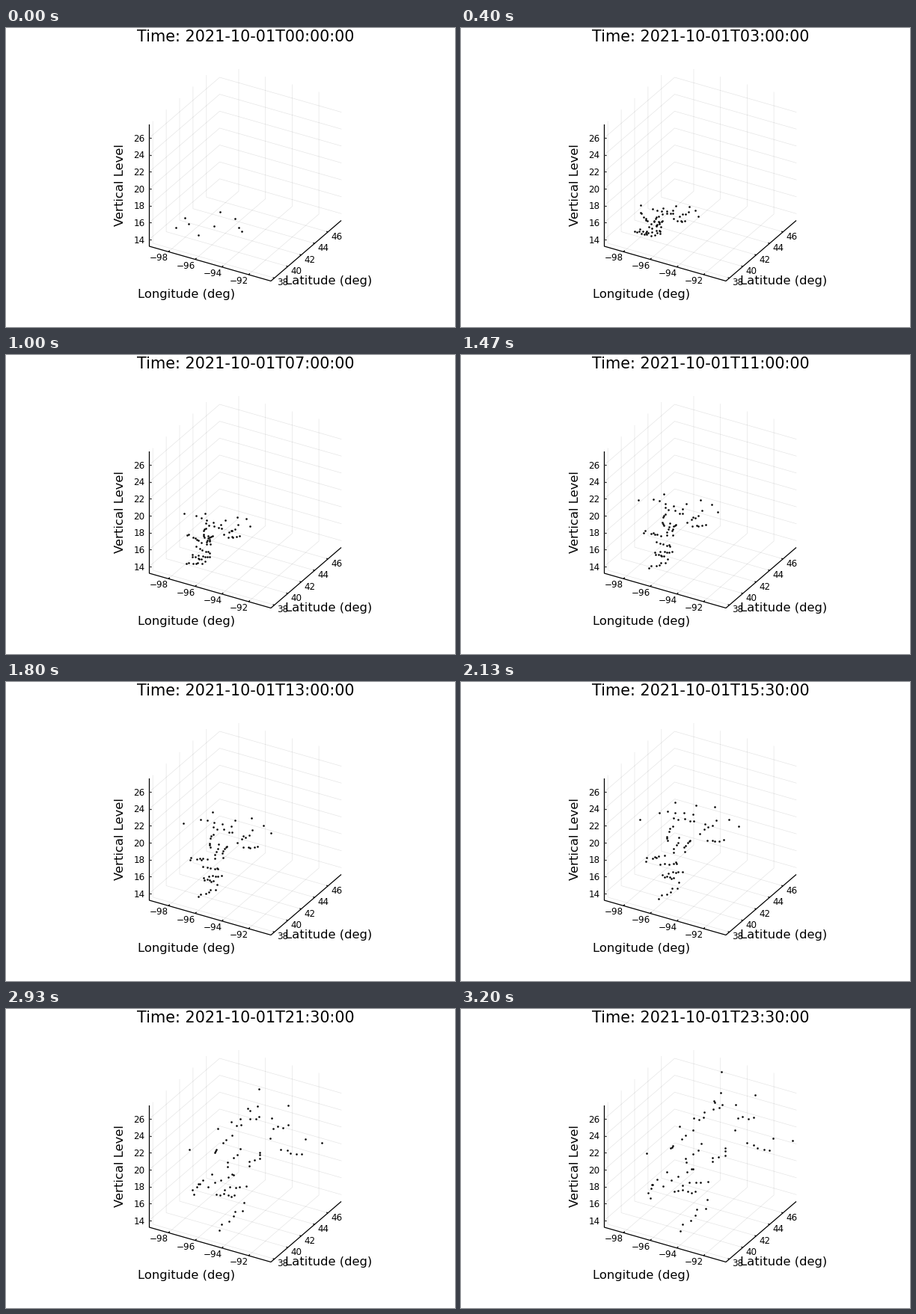
Animation, 600 px wide and 400 px high, one loop 3.27 s. Source, as a matplotlib script:

```python
import numpy as np
import matplotlib.pyplot as plt
from matplotlib.animation import FuncAnimation

plt.rcParams["font.family"] = "DejaVu Sans"
W, H, DPI = 600, 400, 100
FRAMES, LOOP = 49, 3270
PT = 72 / DPI  # points per pixel

fig = plt.figure(figsize=(W / DPI, H / DPI), dpi=DPI, facecolor="white")
ax = fig.add_axes([0, 0, 1, 1])
ax.set_xlim(0, W)
ax.set_ylim(H, 0)
ax.axis("off")

# Projected box: one corner and its three edges
ORIGIN = np.array([191.5, 292])
LON = np.array([162.5, 46.5])
LAT = np.array([94, -81])
LEV = np.array([0, -163])


def project(u, v, w):
    return ORIGIN + u * LON + v * LAT + w * LEV


def line(*pts, **style):
    ax.plot(*zip(*pts), **style)


def text(x, y, s, px, ha="center", **kw):
    return ax.text(x, y, s, fontsize=px * PT, ha=ha, va="baseline", **kw)


GRID = dict(color="black", alpha=0.1, lw=0.7 * PT, zorder=1)
AXIS = dict(color="black", lw=1.25 * PT, zorder=2, solid_capstyle="butt")
TICK, LABEL, TITLE = 11.9, 16.35, 20.8

for i in range(4):
    u = (25.5 + 35.7 * i) / LON[0]
    p = project(u, 0, 0)
    line(p, project(u, 1, 0), project(u, 1, 1), **GRID)
    line(p, p + 0.02 * LAT, **AXIS)
    text(p[0] - 12.4, p[1] + 12, f"\u2212{98 - 2 * i}", TICK)

for i in range(5):
    v = (4.7 + 17.9 * i) / LAT[0]
    p = project(1, v, 0)
    line(p, project(0, v, 0), project(0, v, 1), **GRID)
    line(p, p - 0.013 * LON, **AXIS)
    text(p[0] + 11.3, p[1] + 10, f"{38 + 2 * i}", TICK)

for i in range(7):
    w = (9.2 + 22.63 * i) / -LEV[1]
    p = project(0, 0, w)
    line(p, project(0, 1, w), project(1, 1, w), **GRID)
    line(p, p + (2, 0), **AXIS)
    text(185.7, p[1] + 4.7, f"{14 + 2 * i}", TICK, "right")

line(project(0, 0, 1), ORIGIN, project(1, 0, 0), project(1, 1, 0), **AXIS)

text(241.5, 360.5, "Longitude (deg)", LABEL)
text(431.5, 343.5, "Latitude (deg)", LABEL)
text(157, 210, "Vertical Level", LABEL, rotation=90, rotation_mode="anchor")
title = text(175, 18.5, "", TITLE, "left")

# Guiding streams: place at each of the steps in STEPS
STEPS = (0, 32, 48)
FIRST = 9  # streams that are visible from the start
STREAMS = np.array([
    [(243.5, 262), (239, 184), (249, 194.5)],
    [(285.5, 245.5), (316, 160.5), (350.5, 78)],
    [(305.5, 254.5), (342, 163.5), (397, 112)],
    [(310.5, 266.5), (361, 183), (421.5, 173.5)],
    [(314.5, 272), (374.5, 191.5), (448, 175.5)],
    [(239, 254), (247.5, 240), (253, 254.5)],
    [(278, 264.5), (288.5, 158), (343.5, 123)],
    [(227, 267), (266, 290.5), (295, 297.5)],
    [(257, 277), (293, 267.5), (332, 254)],
    [(263, 273), (306, 214), (357, 195)],
    [(263, 276), (289.5, 241.5), (312, 212)],
    [(229, 271.5), (273, 260), (291.5, 242)],
    [(239.5, 266), (261.5, 235), (255.5, 235.5)],
    [(252, 274.5), (276, 210), (280, 185)],
    [(295, 256), (328, 187), (370, 124)],
])

# Short strands of particles at the middle step, given by their ends
STRANDS = np.array([
    [(264, 173), (310, 173)], [(284, 180), (314, 182)],
    [(321, 199), (344, 184)], [(332, 209), (354, 211)],
    [(284, 190), (274, 208)], [(292, 208), (283, 227)],
    [(308, 208), (299, 224)], [(249, 237), (272, 230)],
    [(268, 243), (290, 241)], [(280, 255), (296, 252)],
    [(272, 259), (287, 262)], [(270, 286), (291, 274)],
])
PER_STRAND = 5


def kernel(a, b):
    return -np.linalg.norm(a[:, None] - b[None], axis=2)


def affine(p):
    return np.column_stack([np.ones(len(p)), (p - 250) / 100])


def spread(nodes, values, points):
    """Radial interpolation with an affine part."""
    n = len(nodes)
    m = np.zeros((n + 3, n + 3))
    m[:n, :n] = kernel(nodes, nodes) + 0.5 * np.eye(n)
    m[:n, n:] = affine(nodes)
    m[n:, :n] = m[:n, n:].T
    coef = np.linalg.solve(m, np.pad(values, ((0, 3), (0, 0))))
    return np.hstack([kernel(points, nodes), affine(points)]) @ coef


rng = np.random.default_rng(4)
mix = np.linspace(0, 1, PER_STRAND)[:, None]
strands = STRANDS[:, :1] * (1 - mix) + STRANDS[:, 1:] * mix
strands = strands.reshape(-1, 2)
strands = strands + rng.uniform(-2, 2, strands.shape)

middle = STREAMS[:, 1]
shifts = (STREAMS - middle[:, None]).reshape(len(STREAMS), -1)
carried = strands[:, None] + spread(middle, shifts, strands).reshape(-1, 3, 2)
poses = np.concatenate([STREAMS, carried])

born = 1 + np.arange(len(poses)) % 7
born[:FIRST] = 0


def flow(t):
    """Quadratic path of every particle through its three poses."""
    a, b, c = STEPS
    weights = [(t - b) * (t - c) / ((a - b) * (a - c)),
               (t - a) * (t - c) / ((b - a) * (b - c)),
               (t - a) * (t - b) / ((c - a) * (c - b))]
    return np.einsum("k,nkd->nd", weights, poses)


dots, = ax.plot([], [], "o", color="black", ms=2.6 * PT, mew=0, zorder=3)


def update(i):
    hours, half = divmod(i, 2)
    day, hour = divmod(hours, 24)
    title.set_text(f"Time: 2021-10-{day + 1:02d}T{hour:02d}:{30 * half:02d}:00")
    dots.set_data(*flow(i)[born <= i].T)
    return title, dots


anim = FuncAnimation(fig, update, frames=FRAMES, interval=LOOP / FRAMES,
                     repeat=True, repeat_delay=0)
plt.show()
```
